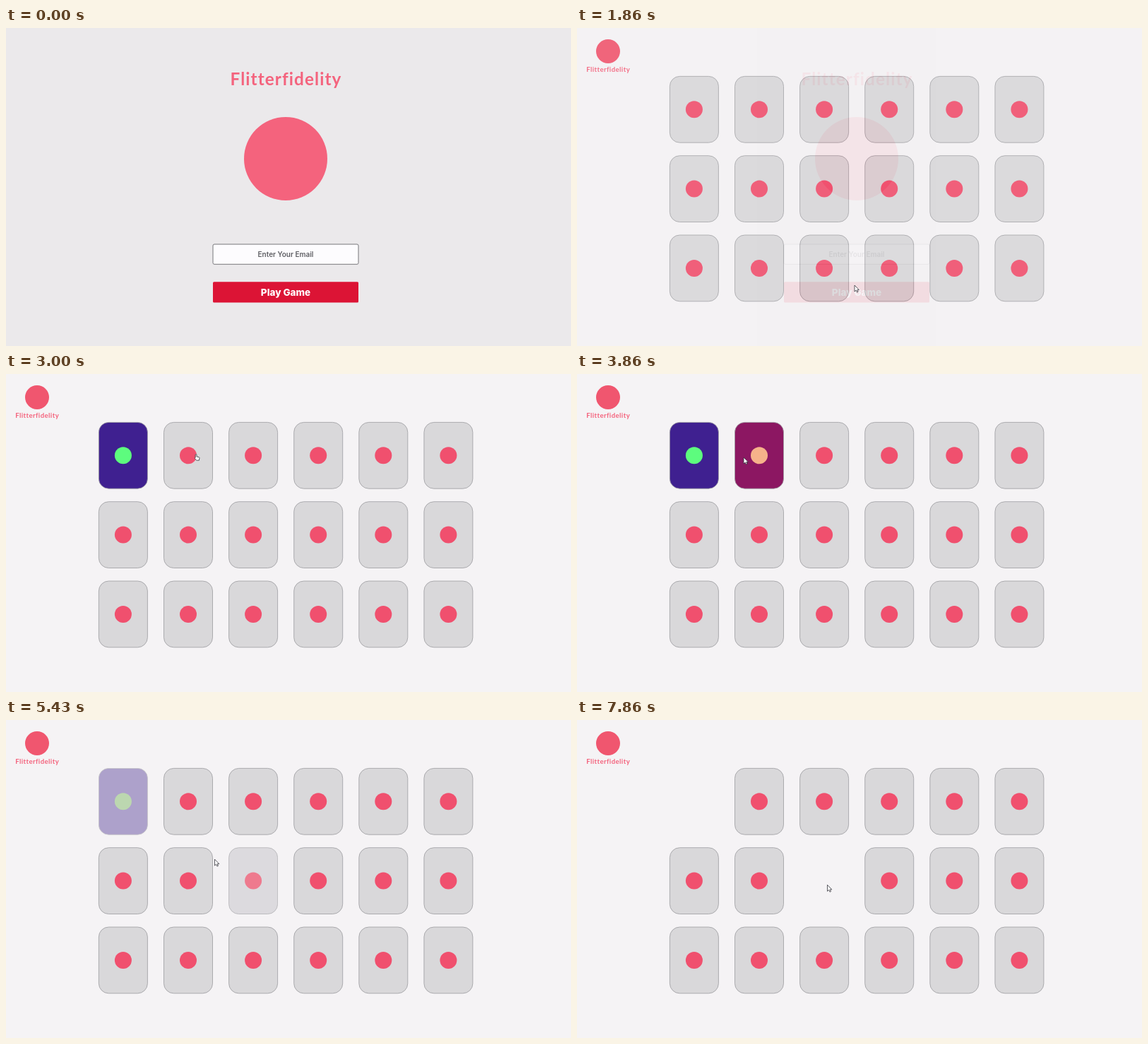
Recreate the animation shown at these times as an HTML page. Size 800 by 450 pixels, loop 8 s.

```html
<!DOCTYPE html>
<html lang="en">
<head>
<meta charset="utf-8">
<title>Flitterfidelity</title>
<style>
  html, body { margin: 0; width: 100%; height: 100%; overflow: hidden; background: #f5f3f5; }
  svg { display: block; width: 800px; height: 450px; }
  text { text-anchor: middle; }
  .brand { font-family: Lato, "Open Sans", sans-serif; font-weight: 700; fill: #f4637d; }
  .ui { font-family: Inter, "Open Sans", sans-serif; }
  .card { stroke: #9c9ca0; stroke-width: .8; }
  .pointer { fill: #fff; stroke: #33333a; stroke-width: .8; stroke-linejoin: round; }
</style>
</head>
<body>
<svg viewBox="0 0 800 450">
  <rect width="800" height="450" fill="#f5f3f5"/>
  <circle cx="44" cy="33" r="17" fill="#f0566f"/>
  <text class="brand" x="44.2" y="62" font-size="9.6" letter-spacing=".4">Flitterfidelity</text>
  <g id="board"></g>
  <g id="splash">
    <rect width="800" height="450" fill="#ebe9eb"/>
    <text class="brand" x="396.5" y="81" font-size="24.3" letter-spacing="1.1">Flitterfidelity</text>
    <circle cx="396" cy="185" r="59" fill="#f4637d"/>
    <rect x="293" y="306" width="206" height="28.3" rx="2" fill="#fdfcfe" stroke="#77777b"/>
    <text class="ui" x="396" y="323.7" font-size="10" font-weight="600" fill="#5f5f64">Enter Your Email</text>
    <rect x="293" y="359.3" width="206" height="29.2" rx="1.5" fill="#dc1435"/>
    <text class="ui" x="396" y="378.8" font-size="13.5" font-weight="800" fill="#fff">Play Game</text>
  </g>
  <g id="pointer" class="pointer">
    <path id="arrow" d="M0 0V9L2.1 7.1 3.5 10 5 9.3 3.7 6.6H6.4Z"/>
    <path id="hand" d="M2 .5C2.8 .5 3 1.1 3 1.7V4L6 4.6C6.8 4.8 7 5.3 6.9 6L6.4 9.2H2.6L.3 6.3C-.1 5.6 .6 5 1.2 5.4V1.7C1.2 1 1.4 .5 2 .5Z"/>
  </g>
</svg>
<script>
const LOOP = 8000, STEP = 1000 / 7, FLIP = 490;
const COLS = 6, ROWS = 3, CARD_W = 69, CARD_H = 93.8;
const LEAVE_SPLASH = 1190, TURN_BACK = 3940, CLEAR_PAIR = 7200;

const GRAY = ['#d9d8da', '#f0506e'];
const BLUE = ['#3f2090', '#5dfc7e'];
const MAGENTA = ['#8c1762', '#f6b28a'];

const clicks = [
  { card: 0, time: 2420, face: BLUE, back: TURN_BACK },
  { card: 1, time: 3180, face: MAGENTA, back: TURN_BACK },
  { card: 0, time: 5080, face: BLUE, pair: true },
  { card: 8, time: 5305, face: BLUE, pair: true }
];

// Places where the pointer rests between moves
const stops = [
  { from: 0, to: STEP, x: 488, y: 67 },
  { from: 1140, to: 1860, x: 393, y: 364 },
  { from: 2290, to: 2500, x: 166, y: 118 },
  { from: 3000, to: 3250, x: 267, y: 113 },
  { from: 3860, to: 3860, x: 236, y: 118 },
  { from: 4430, to: 5080, x: 170, y: 120 },
  { from: 5640, to: LOOP, x: 354.5, y: 233.3 }
];

const $ = id => document.getElementById(id);
const ramp = (t, from, length) => Math.min(1, Math.max(0, (t - from) / length));
const smooth = p => p * p * (3 - 2 * p);
const mix = (a, b, p) => a + (b - a) * p;

function add(parent, tag, attrs) {
  const el = document.createElementNS('http://www.w3.org/2000/svg', tag);
  for (const name in attrs) el.setAttribute(name, attrs[name]);
  return parent.appendChild(el);
}

function drawSide(x, y, [fill, mark]) {
  const side = add($('board'), 'g', {});
  add(side, 'rect', { class: 'card', x, y, width: CARD_W, height: CARD_H, rx: 14, fill });
  add(side, 'circle', { cx: x + CARD_W / 2, cy: y + CARD_H / 2, r: 12, fill: mark });
  return side;
}

const cards = Array.from({ length: COLS * ROWS }, (_, i) => {
  const x = 131.4 + 92.1 * (i % COLS);
  const y = 68.4 + 112.3 * Math.floor(i / COLS);
  const turns = clicks.filter(click => click.card === i);
  const front = drawSide(x, y, GRAY);
  const face = turns.length ? drawSide(x, y, turns[0].face) : null;
  return { x, y, turns, front, face };
});

// 0 = face down, 1 = face up
function flipLevel(turns, t) {
  const turn = turns.filter(({ time }) => time <= t).pop();
  if (!turn) return 0;
  const closing = turn.back ? ramp(t, turn.back, FLIP) : 0;
  return ramp(t, turn.time, FLIP) - closing;
}

function pointerAt(t) {
  const next = stops.findIndex(stop => t < stop.to);
  const b = stops[next], a = stops[Math.max(0, next - 1)];
  const p = t >= b.from ? 1 : smooth(ramp(t, a.to, b.from - a.to));
  return { x: mix(a.x, b.x, p), y: mix(a.y, b.y, p) };
}

const inside = (p, x, y, w, h) => p.x > x && p.x < x + w && p.y > y && p.y < y + h;

function render(t) {
  const pointer = pointerAt(t);
  const onSplash = t < LEAVE_SPLASH;
  let isHand = onSplash && inside(pointer, 293, 359, 206, 29);
  $('splash').style.opacity = 1 - ramp(t, LEAVE_SPLASH, 740);

  for (const { x, y, turns, front, face } of cards) {
    const level = flipLevel(turns, t);
    const cleared = turns.some(turn => turn.pair) ? ramp(t, CLEAR_PAIR, 360) : 0;
    front.style.opacity = 1 - level;
    if (face) face.style.opacity = level ** 3 * (1 - cleared);
    if (!onSplash && level < .5 && inside(pointer, x, y, CARD_W, CARD_H)) isHand = true;
  }

  $('pointer').setAttribute('transform', `translate(${pointer.x} ${pointer.y})`);
  $('pointer').style.display = t < STEP - 1 ? 'none' : '';
  $('hand').style.display = isHand ? '' : 'none';
  $('arrow').style.display = isHand ? 'none' : '';
}

const start = performance.now();
function tick() {
  const t = (performance.now() - start) % LOOP;
  render(Math.floor((t + 5) / STEP) * STEP % LOOP);
  requestAnimationFrame(tick);
}
tick();
</script>
</body>
</html>
```
